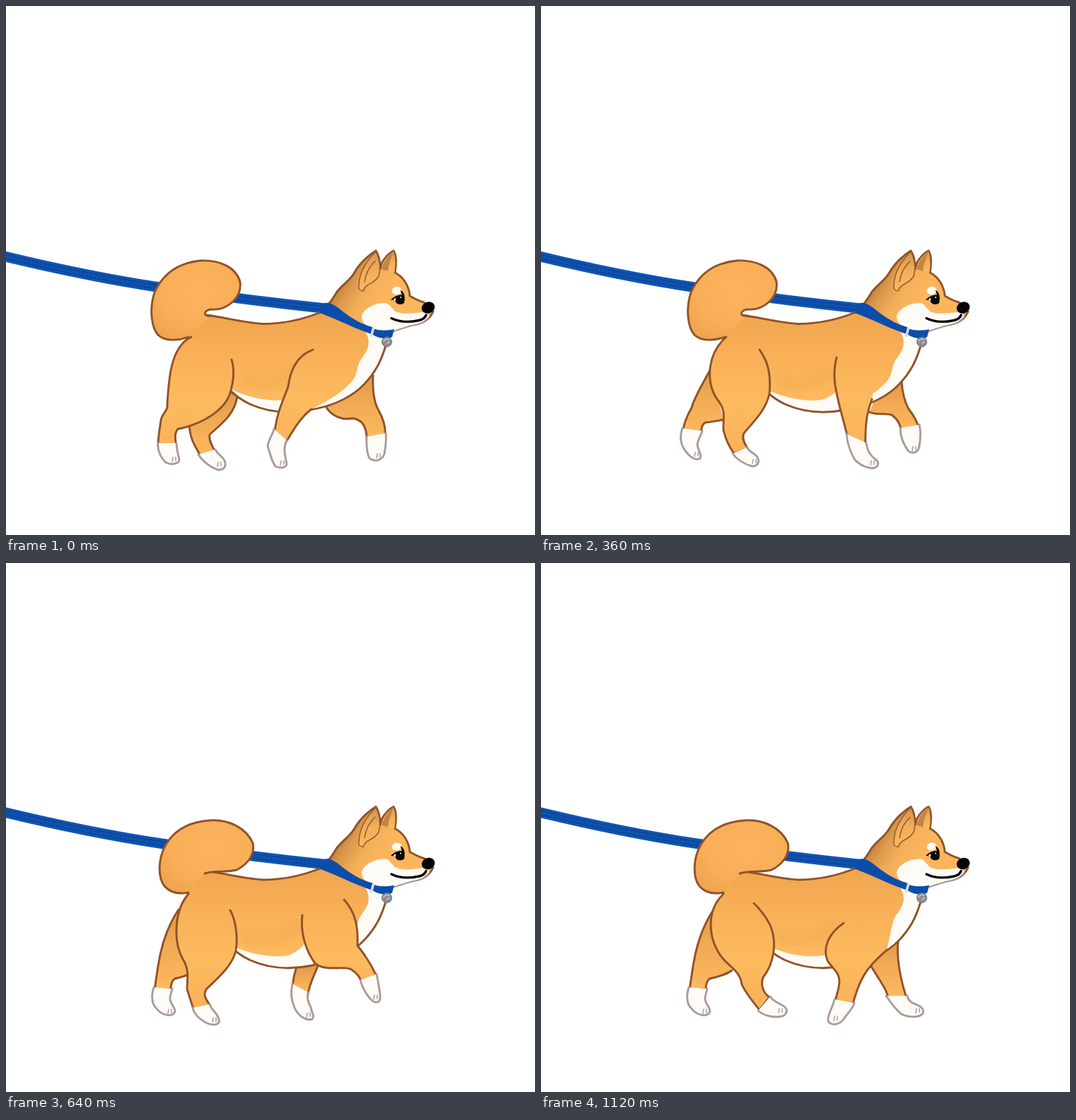
Recreate the animation shown at these times as an HTML page. Size 748 by 748 pixels, loop 1.28 s.

```html
<!DOCTYPE html>
<html lang="en">
<head>
<meta charset="utf-8">
<title>Walking dog</title>
<style>
html, body { margin: 0; width: 100%; height: 100%; overflow: hidden; background: #fff; }
svg { display: block; width: 100%; height: 100%; }
path { stroke-linecap: round; stroke-linejoin: round; }
.line { stroke: #8f5329; stroke-width: 2.9; }
.thin { stroke: #96592c; stroke-width: 1.5; }
.none { fill: none; }
.white { fill: #fdfbf5; }
.paw { fill: #fdfbf5; stroke: #aa9a9e; stroke-width: 2.9; }
.toe { fill: none; stroke: #aa9a9e; stroke-width: 1.5; }
.blue { fill: #0c4dab; }
.smile { fill: none; stroke: #050505; stroke-width: 3.4; }
.ring { fill: none; stroke: #d9d9dc; stroke-width: 3.6; }
.shine { fill: none; stroke: #c4c4c8; stroke-width: 1.6; }
</style>
</head>
<body>
<svg viewBox="0 0 748 748">
  <defs>
    <linearGradient id="coat" gradientUnits="userSpaceOnUse" x1="0" y1="430" x2="0" y2="640">
      <stop offset="0" stop-color="#efa44e"/>
      <stop offset=".32" stop-color="#f9b158"/>
      <stop offset=".62" stop-color="#feba5f"/>
      <stop offset="1" stop-color="#f9b058"/>
    </linearGradient>
    <linearGradient id="far" x1="0" y1="0" x2="0" y2="1">
      <stop offset="0" stop-color="#e0974a"/>
      <stop offset=".45" stop-color="#f2aa54"/>
      <stop offset="1" stop-color="#fdb95f"/>
    </linearGradient>
    <radialGradient id="tailFill" cx=".55" cy=".4" r=".7">
      <stop offset="0" stop-color="#fcb45d"/>
      <stop offset=".6" stop-color="#f9ae58"/>
      <stop offset="1" stop-color="#f0a34e"/>
    </radialGradient>
    <linearGradient id="face" gradientUnits="userSpaceOnUse" x1="474" y1="388" x2="530" y2="424">
      <stop offset="0" stop-color="#bf7e3d"/>
      <stop offset=".25" stop-color="#dc994c"/>
      <stop offset=".6" stop-color="#f5af59"/>
      <stop offset="1" stop-color="#fbb65d"/>
    </linearGradient>
    <linearGradient id="ear" x1="0" y1="0" x2="0" y2="1">
      <stop offset="0" stop-color="#d29450"/>
      <stop offset=".5" stop-color="#f3ae5b"/>
      <stop offset="1" stop-color="#fab862"/>
    </linearGradient>
    <filter id="soft" x="-50%" y="-50%" width="200%" height="200%">
      <feGaussianBlur stdDeviation="7"/>
    </filter>
  </defs>
  <g id="stage"></g>
</svg>
<script>
const path = (d, cls, fill) => `<path d="${d}" class="${cls}"${fill ? ` fill="${fill}"` : ''}/>`;
const shift = (x, y, inner) => `<g transform="translate(${x} ${y})">${inner}</g>`;

// A leg is [outline, paw outline, toe position, optional unlined join to the body].
const rearFar = ['M244 490C224 520 218 550 215 570L210 603L233 603C233 596 234 592 238 588C250 585 262 582 270 576',
  'M209 600C205 612 206 624 213 630C220 640 236 643 239 634C239 627 231 623 232 614L235 602', '229 637'];

const stride = {
  far: [rearFar,
    ['M462 562C474 584 488 600 491 615L517 615C510 595 502 560 505 535L490 530',
      'M488 612C496 624 502 632 510 638C520 643 535 643 540 637C542 630 537 627 530 624C523 622 519 619 518 612', '530 636']],
  near: [
    ['M258 468C234 490 235 530 256 558C268 572 282 578 284 596C290 609 300 621 309 632L323 614C312 606 311 594 314 586C330 566 334 535 324 512C318 500 310 490 301 481',
      'M307 633C316 641 330 643 341 641C348 638 349 632 345 628C338 622 330 622 324 613', '336 636'],
    ['M428 509C406 524 398 545 405 562C412 574 422 578 422 592C421 606 417 612 416 620L441 623C446 606 452 586 466 570C474 560 482 554 489 547',
      'M415 617C412 630 404 640 406 648C411 655 422 653 428 645C434 636 441 630 443 622', '414 647', 'L498 505L450 490']],
  up: true
};

const reach = {
  far: [
    ['M318 545L327 552C323 580 300 594 288 606C286 614 292 622 295 629L275 636C266 620 260 612 259 590L275 575',
      'M272 634C278 644 290 653 301 656C311 655 312 648 308 641C303 634 299 634 296 627', '299 651'],
    ['M452 566C460 580 475 586 490 583C505 585 510 597 510 612L536 606C537 595 534 585 527 572C520 560 518 545 519 522L490 535',
      'M510 609C509 626 512 640 516 641C524 645 533 641 535 633C537 622 538 612 537 604', '524 639']],
  near: [
    ['M262 468C232 482 230 530 228 564C230 572 220 576 219 586C217 600 215 610 215 622L241 622C239 612 238 604 243 598C275 592 312 572 318 543C323 525 322 510 319 500',
      'M215 618C214 628 219 640 227 646C236 650 246 646 245 641C243 632 241 626 241 618', '235 644'],
    ['M434 486C412 494 402 515 399 538C392 558 384 572 380 600L384 614L397 615C406 600 416 582 432 570',
      'M379 598C378 604 371 614 370 622C373 632 376 645 381 651C388 654 396 653 397 648C395 636 391 626 397 614', '388 649', 'L450 555L445 490']]
};

const plant = {
  far: [
    ['M240 513C228 535 216 555 213 568C205 582 202 590 201 600L227 603C226 596 228 592 232 589C242 588 252 586 258 585',
      'M200 597C196 607 197 618 202 626C210 638 218 643 225 640C228 633 222 629 221 620C222 612 226 608 228 601', '217 637'],
    ['M464 574C475 580 490 574 497 579C506 586 509 594 509 602L535 600C533 590 528 580 520 570C513 558 511 545 510 532L480 540',
      'M508 597C508 610 514 622 520 630C528 634 534 630 535 622C537 610 537 600 535 592', '525 629']],
  near: [
    ['M262 468C234 492 232 535 252 560C262 574 257 586 258 600C262 616 267 624 273 633L292 625C286 616 284 610 287 604C300 588 318 572 323 548C325 528 322 510 317 500C314 494 312 490 309 486',
      'M271 633C277 641 288 648 299 651C308 650 309 644 306 638C302 631 296 633 291 624', '299 647'],
    ['M418 497C414 512 414 530 417 542C421 566 428 585 433 608L459 621C458 600 460 575 468 556',
      'M432 605C433 618 438 632 444 642C452 650 464 655 472 653C478 650 478 645 473 641C466 636 461 630 460 618', '466 649', 'L470 540L450 500']],
  tailX: 2
};

const lift = {
  far: [rearFar,
    ['M412 568C408 580 405 590 405 606L427 610C428 598 436 582 441 570',
      'M405 595C402 608 404 620 408 629C413 640 424 648 433 645C437 640 432 636 431 628C426 620 426 612 427 607', '425 642']],
  near: [
    ['M258 468C238 490 236 535 250 560C260 576 256 590 256 602C259 614 262 620 265 631L289 626C281 615 279 610 283 603C300 586 320 570 325 548C328 530 325 505 317 491',
      'M264 629C266 638 275 646 285 651C296 655 303 652 301 645C298 635 291 633 288 624', '292 649'],
    ['M419 498C416 522 424 550 438 567C452 577 475 570 487 574C497 580 502 588 503 595L523 582C515 565 506 552 497 541C498 515 495 495 478 476',
      'M501 590C504 602 512 614 519 620C526 623 530 620 529 612C528 600 526 592 524 581', '520 617']],
  up: true
};

const step = {
  far: [
    ['M262 588C272 600 278 612 283 624L303 614C301 606 299 602 300 598C312 586 318 570 321 550',
      'M281 622C288 632 298 640 310 643C322 645 331 641 329 633C326 627 318 629 312 626C306 622 304 618 302 611', '318 639', 'L300 540'],
    ['M392 572C390 585 388 595 387 614L404 616C408 600 422 585 440 571',
      'M387 599C382 610 378 620 380 629C384 640 388 650 396 653C404 654 408 650 406 645C402 636 402 628 406 615', '397 650']],
  near: [
    ['M262 468C228 492 218 530 220 560C222 574 213 578 212 590C210 602 210 612 210 623L237 626C233 616 233 608 235 602C270 592 305 575 309 543C311 530 310 520 309 509',
      'M210 620C209 632 216 644 224 650C234 654 243 650 241 644C239 636 236 630 238 621', '232 648'],
    ['M425 517C424 535 432 558 448 577C464 595 480 610 489 624L517 621C508 605 497 575 496 543',
      'M488 622C500 632 506 640 516 645C528 650 542 648 546 642C547 634 540 631 532 630C524 627 520 624 517 618', '534 644', 'C498 528 503 512 506 495L465 490']]
};

const leg = fill => ([outline, paw, toe, join = '']) =>
  path(outline + join, '', `url(#${fill})`) + path(outline, 'line none') +
  path(paw, 'paw') + path(`M${toe}l1-6m4 5l0-5`, 'toe');

const tailDown = 'M290 438C278 440 279 430 290 429C313 431 334 412 331 390C325 368 300 359 275 360C245 363 222 378 210 405C202 430 206 455 215 465C225 475 245 473 258 468';
const tailUp = 'M281 439C296 434 312 438 326 434C344 425 352 410 349 396C340 375 315 362 288 364C258 366 238 378 226 398C214 420 215 445 224 457C234 468 248 468 258 466';

const strap = 'M-6 353C60 369 140 386 215 397.5C290 409 370 419 450 427.5';
const leash = `<g fill="none"><path d="${strap}" stroke="#0f55b5" stroke-width="14.5"/>
  <path d="${strap}" stroke="#0a469d" stroke-width="8"/>
  <path d="${strap}" stroke="#1a5cb8" stroke-width="5" stroke-dasharray="1 5" opacity=".5"/></g>`;

const back = 'M284 437C308 440 336 448 364 449.5C398 449 424 442 447 432';
const belly = 'C400 577 370 574 345 563C330 556 322 548 309 537';
const under = 'C531 500 523 520 500 541C480 558 455 567 430 571' + belly;
const body =
  path(back + 'L462 420L548 458L537 480' + under + 'L256 474L254 455L272 440Z', '', 'url(#coat)') +
  '<path d="M340 530C365 540 390 535 410 515" fill="none" stroke="#eda24c" stroke-width="18" opacity=".35" filter="url(#soft)"/>' +
  path('M309 537C345 558 385 560 400 556C415 550 424 540 427 530C428 545 431 560 435 571L430 571' + belly, 'white') +
  path('M508 460C518 478 510 488 504 497C494 508 499 522 487 533C474 547 456 558 432 570C455 567 480 558 500 541C523 520 531 500 537 480L547 462Z', 'white') +
  path(back, 'line none') + path('M537 480' + under, 'line none');

const head =
  path('M443 434C456 424 462 414 468 404C478 392 486 388 492 378C500 364 512 353 523 346C527 352 529 362 529 372L531 364C536 355 542 349 548 346C552 352 552 365 550 377C562 383 570 396 571 410C578 414 586 418 591 419L604 432C600 441 592 448 580 450C568 452 558 456 549 459', 'line', 'url(#face)') +
  path('M503 438C507 426 524 419 537 420C545 422 545 430 553 433C567 437 580 433 592 433L599 437C594 446 586 448 580 450C568 452 558 456 549 459L520 458C508 452 502 446 503 438Z', 'white') +
  path('M599 439C594 448 586 449 580 451C568 453 558 457 549 460', 'toe') +
  path('M531 372C532 360 541 351 548 347C551 357 551 368 549 377L540 374Z', '', 'url(#ear)') +
  path('M531 372C534 361 541 352 548 347C544 357 541 366 540 375Z', '', '#c48443') +
  path('M499 396C499 378 509 361 523 347C529 360 530 372 527 382C519 395 509 391 505 403C500 402 498 400 499 396', 'thin', 'url(#ear)') +
  path('M507 390C509 377 515 367 522 361', 'thin none') +
  '<ellipse cx="552.5" cy="402.5" rx="7" ry="5.5" fill="#fffdf7" transform="rotate(-12 552.5 402.5)"/>' +
  path('M544 415.5C549 410 555 408 560 408.5L557.5 401.5C563 404 565 411 563 420C557 424 551 421 550 416Z', '', '#050505') +
  path('M547.5 415L551 412.5L551 417Z', 'white') +
  '<circle cx="558" cy="412" r="1" fill="#fff"/>' +
  '<ellipse cx="597" cy="426.5" rx="9.5" ry="8" fill="#050505" transform="rotate(-22 597 426.5)"/>' +
  path('M594 437C592 442 589 443.5 584 444.500C570 447.500 556 447 545 441.500', 'smile');

const collar =
  path('M444 434C444 428 447 422 451 420C458 419 464 423 470 427C486 440 502 450 518 454L517 464C498 458 470 444 444 434Z', 'blue') +
  path('M519 456C530 460 540 459 549 457L546 468C538 472 528 470 519 465Z', 'blue') +
  path('M519.5 456L516.5 466', 'ring') +
  '<circle cx="538.5" cy="475" r="7" fill="#8d8d91" stroke="#707074"/>' +
  path('M534 474Q537 469 542 472M539 477l3-2', 'shine');

function draw({ far, near, up, tailX = 0 }) {
  const dy = up ? -1.5 : 0;
  return shift(0, dy, leash) +
    far.map(leg('far')).join('') +
    shift(0, dy, body) +
    near.map(leg('coat')).join('') +
    shift(tailX, 0, path(up ? tailUp : tailDown, 'line', 'url(#tailFill)')) +
    shift(0, dy, head + collar);
}

const LOOP = 1280;
const poses = [[0, reach], [120, stride], [360, plant], [640, lift], [880, step], [1120, stride]]
  .map(([start, pose]) => ({ start, art: draw(pose) }));
const stage = document.getElementById('stage');
const t0 = performance.now();
let shown;

function render(now) {
  const t = Math.max(0, now - t0) % LOOP;
  const pose = poses.filter(p => p.start <= t).pop();
  if (pose !== shown) {
    stage.innerHTML = pose.art;
    shown = pose;
  }
}

function tick() {
  render(performance.now());
  requestAnimationFrame(tick);
}
tick();
</script>
</body>
</html>
```
